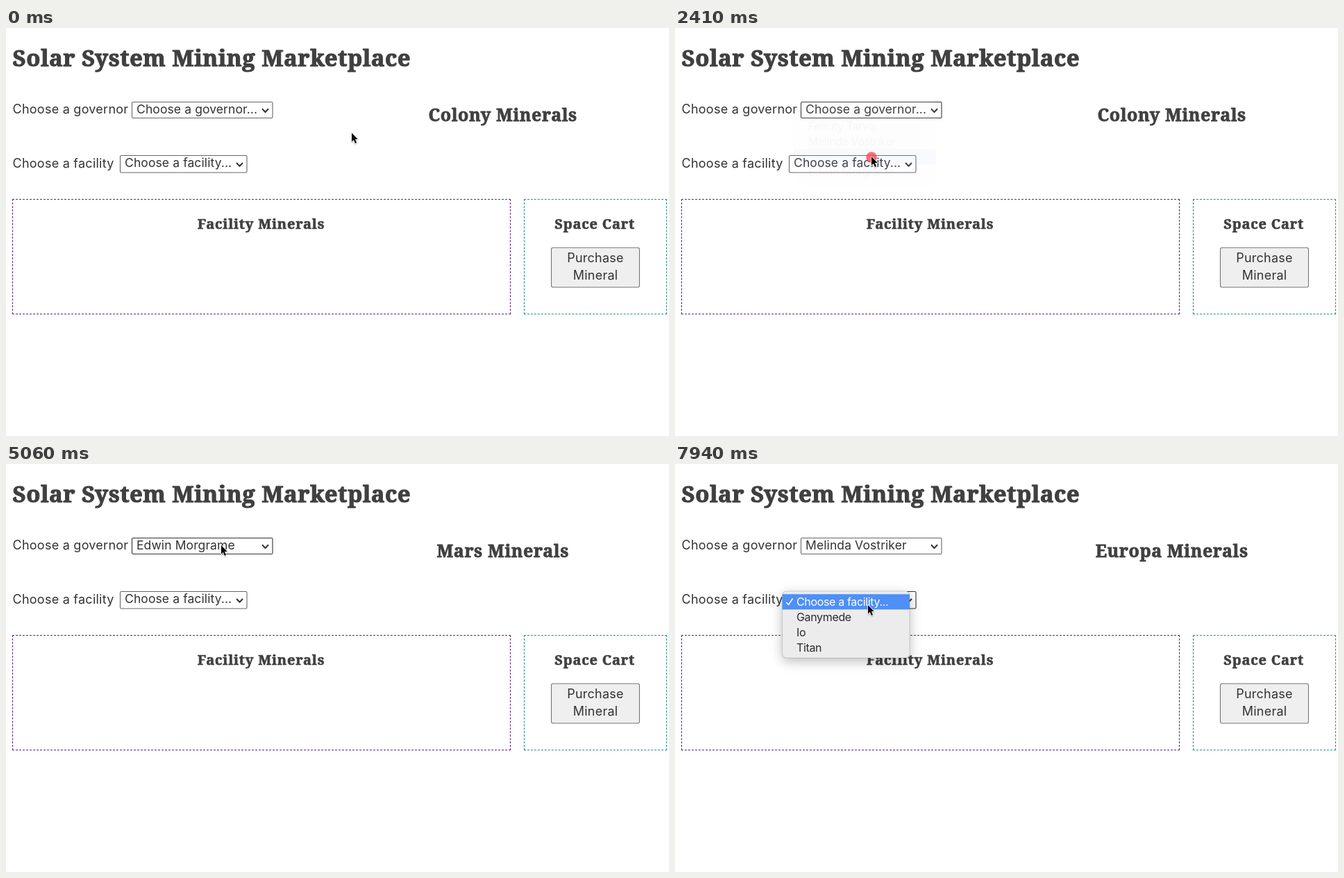
Write an HTML page with a canvas that moves like this. It is 955x587 px and loops after 8 s.

```html
<!DOCTYPE html>
<html lang="en">
<head>
<meta charset="utf-8">
<title>Solar System Mining Marketplace</title>
<style>
html, body { margin: 0; width: 100%; height: 100%; overflow: hidden; background: #fff; }
canvas { display: block; }
</style>
</head>
<body>
<canvas id="stage" width="955" height="587"></canvas>
<script>
const ctx = document.getElementById('stage').getContext('2d');
const LOOP = 8000, FRAME = 1000 / 17;
const ROW = 22, PAD = 4;
const INK = '#333', HEADING = '#404040';

const governors = ['Choose a governor...', 'Felicity Tarvo', 'Melinda Vostriker', 'Nina Quell', 'Edwin Morgrame'];
const facilities = ['Choose a facility...', 'Ganymede', 'Io', 'Titan'];

// Each popup opens on one click and fades after the next.
const governorMenu = { x: 171.5, w: 204, y: 108, items: governors };
const menus = [
  { ...governorMenu, open: 1040, pick: 2230, checked: 0 },
  { ...governorMenu, open: 3440, pick: 4170, checked: 3 },
  { ...governorMenu, open: 5080, pick: 5755, checked: 4 },
  { x: 154.5, w: 183.5, y: 187, items: facilities, open: 7400, pick: Infinity, checked: 0 }
];
const clicks = menus.flatMap(m => [m.open, m.pick]);
const choices = [[0, 0], [2230, 3], [4170, 4], [5755, 2]];
const colonies = { 0: 'Colony', 2: 'Europa', 3: 'Earth', 4: 'Mars' };

// Cursor path: time, x, y
const path = [
  [0, 498, 151], [430, 498, 151], [1000, 320, 118], [1540, 320, 118],
  [2000, 283, 185], [3070, 283, 185], [3400, 304, 117], [3560, 304, 117],
  [3940, 302, 135], [4830, 302, 135], [5050, 310, 117], [5250, 310, 117],
  [5590, 309, 78], [6660, 309, 78], [7240, 281, 192], [7650, 281, 192],
  [7940, 278, 203], [LOOP, 278, 203]
];

function cursorAt(t) {
  const i = path.findIndex(p => p[0] > t);
  const [t0, x0, y0] = path[i - 1], [t1, x1, y1] = path[i];
  const u = (t - t0) / (t1 - t0), e = u * u * (3 - 2 * u);
  return { x: x0 + (x1 - x0) * e, y: y0 + (y1 - y0) * e };
}

function choiceAt(t, delay) {
  return choices.filter(([at]) => at === 0 || t >= at + delay).pop()[1];
}

function text(str, x, y, font, { color = INK, spacing = 0, align = 'left', embolden = 0 } = {}) {
  ctx.font = font;
  ctx.letterSpacing = spacing + 'px';
  ctx.textAlign = align;
  ctx.fillStyle = ctx.strokeStyle = color;
  ctx.fillText(str, x, y);
  if (embolden) {
    ctx.lineJoin = 'round';
    ctx.lineWidth = embolden;
    ctx.strokeText(str, x, y);
  }
}

function heading(str, x, y, size, spacing, align = 'center') {
  text(str, x, y, `bold ${size}px "Noto Serif", serif`,
    { color: HEADING, spacing, align, embolden: size / 30 });
}

function body(str, x, y, align) {
  text(str, x, y, '18px Inter, sans-serif', { spacing: 0.25, align });
}

function line(points, color, width) {
  ctx.beginPath();
  points.forEach(([x, y]) => ctx.lineTo(x, y));
  ctx.strokeStyle = color;
  ctx.lineWidth = width;
  ctx.stroke();
}

function roundBox(x, y, w, h, r, fill, stroke) {
  ctx.beginPath();
  ctx.roundRect(x, y, w, h, r);
  ctx.fillStyle = fill;
  ctx.fill();
  if (stroke) {
    ctx.strokeStyle = stroke;
    ctx.lineWidth = 1.1;
    ctx.stroke();
  }
}

// Dashes run edge to edge; the gap adapts so each side ends on a dash.
function dashedLine(x0, y0, x1, y1, color) {
  const dash = 3, length = Math.hypot(x1 - x0, y1 - y0);
  const count = Math.round((length + 2) / (dash + 2));
  ctx.setLineDash([dash, (length - count * dash) / (count - 1)]);
  line([[x0, y0], [x1, y1]], color, 1.1);
  ctx.setLineDash([]);
}

function dashedBox(x, y, w, h, color) {
  const r = x + w, b = y + h;
  dashedLine(x, y + 0.5, r, y + 0.5, color);
  dashedLine(x, b - 0.5, r, b - 0.5, color);
  dashedLine(x + 0.5, y, x + 0.5, b, color);
  dashedLine(r - 0.5, y, r - 0.5, b, color);
}

function select(label, x, y, w, h, focused) {
  roundBox(x, y, w, h, 1.5, '#fff', focused ? '#333' : '#666');
  text(label, x + 6.5, y + 16.6, '17.5px Inter, sans-serif', { spacing: 0.1 });
  const cx = x + w - 10.5, cy = y + h / 2 + 0.3;
  line([[cx - 4.5, cy - 2], [cx, cy + 2.7], [cx + 4.5, cy - 2]], INK, 2);
}

function page(t) {
  const governor = choiceAt(t, 290), owner = choiceAt(t, 350);
  const onFacility = t >= 7230;
  heading('Solar System Mining Marketplace', 9.5, 54.5, 33, 0.45, 'left');
  body('Choose a governor', 9.5, 123);
  select(governors[governor], 181.5, 106.5, 202.5, 23, t >= 1040 && !onFacility);
  heading(colonies[owner] + ' Minerals', 715.7, 134, 25, 0.6);

  ctx.save();
  if (owner === 3) {
    body('7 tons of Iron', 716.5, 181, 'center');
    body('2 tons of Chromium', 716.5, 206, 'center');
    ctx.translate(0, 50);
  }
  body('Choose a facility', 9.5, 200.5);
  select(facilities[0], 164.5, 183.5, 182.5, 24.5, onFacility);

  dashedBox(9, 246, 718, 166, '#5c2a82');
  heading('Facility Minerals', 367.5, 289, 20, 0.8);

  dashedBox(746, 246, 206, 166, '#2a8f8b');
  heading('Space Cart', 848, 289, 20, 0.8);
  roundBox(785.5, 316, 127, 57, 2.5, '#efefef', '#767676');
  body('Purchase', 849, 337, 'center');
  body('Mineral', 849, 362, 'center');
  ctx.restore();
}

function drawMenu(m, t, cursor) {
  const fade = Math.min(1, (m.pick + 186 - t) / 126);
  if (t < m.open || fade <= 0) return;
  const top = m.y - m.checked * ROW;
  const hovered = Math.floor((cursor.y - top) / ROW);
  const height = m.items.length * ROW + 2 * PAD;

  ctx.save();
  ctx.globalAlpha = fade;
  ctx.save();
  ctx.shadowColor = 'rgba(0,0,0,.26)';
  ctx.shadowBlur = 17;
  ctx.shadowOffsetY = 5;
  roundBox(m.x, top - PAD, m.w, height, 6, '#ececec');
  ctx.restore();
  roundBox(m.x, top - PAD, m.w, height, 6, '#ececec', 'rgba(0,0,0,.14)');

  m.items.forEach((item, i) => {
    const y = top + i * ROW, color = i === hovered ? '#fff' : '#2b2b2b';
    if (i === hovered) {
      ctx.fillStyle = '#4f8ff7';
      ctx.fillRect(m.x, y + 0.3, m.w, ROW);
    }
    if (i === m.checked) {
      line([[m.x + 6, y + 12], [m.x + 9, y + 15.5], [m.x + 15, y + 6.5]], color, 1.5);
    }
    text(item, m.x + 20.5, y + 17, '16px Inter, sans-serif', { color, spacing: -0.35 });
  });
  ctx.restore();
}

function drawClick(t, { x, y }) {
  const start = clicks.find(c => t >= c && t < c + 285);
  if (start === undefined) return;
  ctx.beginPath();
  ctx.arc(x, y + 1, 21.5 * (1 - (t - start) / 285), 0, 7);
  ctx.fillStyle = 'rgba(255,66,70,.76)';
  ctx.fill();
}

function drawCursor({ x, y }) {
  const arrow = [[0, 0], [0, 12.6], [2.9, 9.9], [5, 15], [7, 14.1], [4.9, 9.1], [8.8, 9.1]];
  ctx.save();
  ctx.translate(x, y);
  ctx.beginPath();
  arrow.forEach(([px, py]) => ctx.lineTo(px, py));
  ctx.closePath();
  ctx.shadowColor = 'rgba(0,0,0,.3)';
  ctx.shadowBlur = 2;
  ctx.shadowOffsetY = 1;
  ctx.strokeStyle = '#fff';
  ctx.lineWidth = 1.6;
  ctx.stroke();
  ctx.shadowColor = 'transparent';
  ctx.fillStyle = '#000';
  ctx.fill();
  ctx.restore();
}

function draw(now) {
  // The screen refreshes 17 times a second.
  const t = Math.floor((now % LOOP + 5) / FRAME) % 136 * FRAME;
  const cursor = cursorAt(t);
  ctx.fillStyle = '#fff';
  ctx.fillRect(0, 0, 955, 587);
  page(t);
  menus.forEach(m => drawMenu(m, t, cursor));
  drawClick(t, cursor);
  drawCursor(cursor);
}

const begin = performance.now();
function tick() {
  draw(performance.now() - begin);
  requestAnimationFrame(tick);
}
tick();
</script>
</body>
</html>
```
